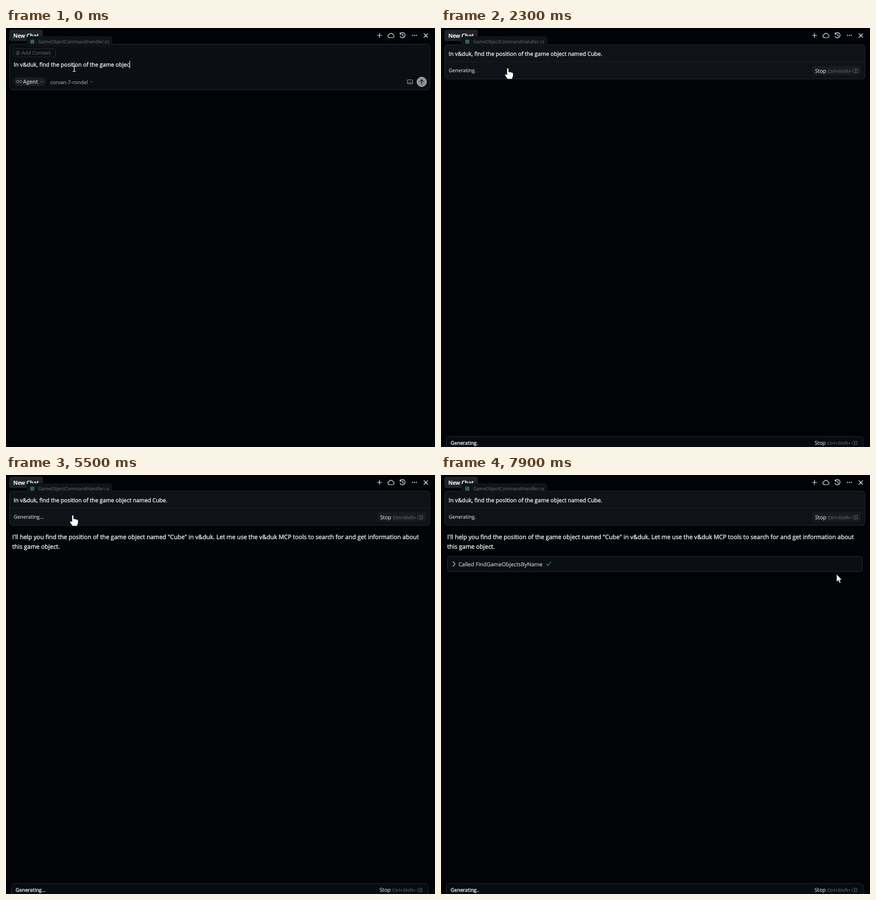
Write an HTML page that moves like this. It is 758 by 739 pixels and loops after 8000 ms.

```html
<!DOCTYPE html>
<html lang="en">
<head>
<meta charset="utf-8">
<title>Chat panel</title>
<style>
  html, body { margin: 0; width: 100%; height: 100%; overflow: hidden; background: #010306; }
  svg { display: block; width: 758px; height: 739px; }
  text { font: 9px "Open Sans", "Noto Sans", sans-serif; color: #c4c9cf; fill: currentColor; stroke: currentColor; stroke-width: .2px; white-space: pre; text-rendering: geometricPrecision; }
  .prompt { font-size: 9.8px; color: #f2f4f6; stroke-width: .3px; }
  .reply { font-size: 10.6px; color: #f4f6f8; stroke-width: .32px; }
  .status { font-size: 8.9px; }
  .call { font-size: 9.67px; }
  .bold { font-weight: 600; }
  .keys { font-size: 7.6px; letter-spacing: .42px; color: #626870; }
  .bright { color: #f2f4f6; stroke-width: .3px; }
  .dim { color: #9299a1; }
  .faint { color: #555b63; }
  .line { fill: none; stroke: #d5d9de; stroke-width: 1.2; stroke-linecap: round; stroke-linejoin: round; }
  .box { fill: #0b0e14; stroke: #22272e; }
  .btn { fill: #181c22; }
  .cursor path { fill: #fff; stroke: #111; stroke-width: .6; }
</style>
</head>
<body>
<svg viewBox="0 0 758 739">
  <defs>
    <path id="erase" d="M0 3L3 0H9.5V6H3ZM4.5 1.8L7 4.2M7 1.8L4.5 4.2" fill="none" stroke-width=".9"/>
    <path id="caretKey" d="M0 3L2 .3L4 3" fill="none" stroke-width=".9"/>
    <path id="enter" d="M0 4.7L3 2.500V3.800H5.500V.5H8V5.700H3V7Z" fill="none" stroke-width=".8"/>
    <g id="stop">
      <text x="4.5" y="12" style="font-size:9.3px">Stop</text>
      <text class="keys" x="27" y="12">Ctrl+Shift+</text>
      <use href="#erase" x="70" y="6" stroke="#626870"/>
    </g>
  </defs>
  <rect width="758" height="739" fill="#010306"/>

  <rect x="6" y="3" width="59" height="20" rx="4" fill="#1f2329"/>
  <text class="bold bright" x="13" y="16.5" style="font-size:9.6px">New Chat</text>
  <g class="line">
    <path d="M656 13H664M660 9V17M738.5 10L745 16.5M745 10L738.5 16.5"/>
    <path d="M678 17H683.5A2.6 2.6 0 0 0 684 12A3.8 3.8 0 0 0 677 11.5A2.8 2.8 0 0 0 678 17Z"/>
    <path d="M696.5 10.5A4.6 4.6 0 1 1 696.3 14.5M696.3 8.5V11H699M701 10.5V13.5L703 14.5"/>
    <path d="M718 13H718.1M721.5 13H721.6M725 13H725.1" stroke-width="2"/>
  </g>

  <g id="compose">
    <rect class="box" x="6.5" y="28.5" width="742.5" height="80.5" rx="5"/>
    <rect x="13.5" y="36.5" width="74" height="14.5" rx="3" fill="none" stroke="#22272e"/>
    <text class="faint" x="17" y="47">@ Add Context</text>
    <text class="prompt" id="typed" x="13.5" y="68"></text>
    <rect id="caret" y="58" width="1" height="13" fill="#fff"/>
    <rect x="13.5" y="87" width="57" height="15.5" rx="7.5" fill="#1b1f25"/>
    <path class="line" style="stroke:#9299a1;stroke-width:1" d="M23 94.5C21 91.5 18.5 92 18.5 94.5S21 97.5 23 94.5S27.5 92 27.5 94.5S25 97.5 23 94.5"/>
    <text class="bold" x="30" y="98" style="font-size:9.4px;color:#a9afb6">Agent</text>
    <path class="line" style="stroke:#6a7078;stroke-width:.9" d="M61.5 94.2L63.5 96.2L65.5 94.2M149 94.2L151 96.2L153 94.2"/>
    <text class="dim" x="78" y="98.5">corvan-7-rondel</text>
    <g class="line" style="stroke:#9299a1;stroke-width:1">
      <rect x="709" y="91.5" width="9.5" height="7" rx="1"/>
      <path d="M710 97.5L713 95L715 97L716.5 95.5L718 97"/>
    </g>
    <circle cx="734.5" cy="95" r="8.3" fill="#8b8f95" stroke="#c9ccd1"/>
    <path class="line" style="stroke:#15181c" d="M734.5 99V91.5M731.5 94.3L734.5 91.3L737.5 94.3"/>
  </g>

  <g id="chat">
    <g id="head">
      <rect class="box" x="6.5" y="28.5" width="742.5" height="60.5" rx="5" style="fill:#0f1319"/>
      <path d="M7 58.5H749" stroke="#1a1f26"/>
      <text class="prompt" id="sent" x="13.5" y="47.7"></text>
      <text class="status" id="topStatus" x="13.5" y="76.5"></text>
      <rect class="btn" x="656.5" y="65.5" width="85.5" height="16.5" rx="3"/>
      <use href="#stop" x="656.5" y="65.5"/>
    </g>
    <text class="reply" id="line1" x="11" y="113"></text>
    <text class="reply" id="line2" x="11" y="130"></text>
    <circle id="loader" cx="15.5" r=".7" fill="#2a2f36"/>

    <g id="tool">
      <rect class="box" id="toolBox" x="11.5" y="143.5" width="733" rx="4"/>
      <path class="line" style="stroke:#b3b9c0" d="M21 153L25 157L21 161"/>
      <text class="call" id="call" x="31" y="160.7"></text>
      <path id="check" class="line" style="stroke:#4c9a5e" d="M186.5 157L189 159.8L194 153.5"/>
      <g id="actions">
        <text class="dim" x="616" y="179.5">Cancel</text>
        <use href="#caretKey" x="647.5" y="174.5" stroke="#626870"/>
        <use href="#erase" x="653.5" y="173.5" stroke="#626870"/>
        <rect x="673.5" y="167.5" width="63.5" height="18" rx="3" fill="#2c9a40"/>
        <text class="bright" x="679.5" y="179.5">Run tool</text>
        <use href="#caretKey" x="719" y="174.5" stroke="#b9dcc0"/>
        <use href="#enter" x="723.5" y="173" stroke="#b9dcc0"/>
      </g>
    </g>

    <rect class="box" x="9.5" y="720.5" width="736.5" height="30" rx="5" style="fill:#080b11"/>
    <text class="status bright" id="lowStatus" x="17" y="734.5"></text>
    <use href="#stop" id="lowStop" y="723"/>
    <g id="accept">
      <rect class="btn" x="685.5" y="723" width="55" height="20" rx="3"/>
      <text x="690.5" y="734.7">Accept</text>
      <use href="#caretKey" x="722.5" y="729" stroke="#aeb4bb"/>
      <use href="#enter" x="727" y="727.5" stroke="#aeb4bb"/>
    </g>
  </g>

  <rect x="36" y="14.5" width="152" height="18.5" rx="5" fill="#10141a"/>
  <rect x="43" y="20.5" width="7" height="7" fill="#2f6658"/>
  <text class="faint" x="57" y="27" style="font-size:8px">GameObjectCommandHandler.cs</text>

  <g class="cursor">
    <path id="beam" d="M-2.5 -5H-.5V-4.5H.5V-5H2.5V-4H.5V4H2.5V5H-2.5V4H-.5V-4H-2.5Z" style="stroke:none"/>
    <path id="hand" d="M-2.5 0Q-1 -2.5 .5 0V5.5Q2 4.5 3 6Q4.5 5 5.5 6.7Q8 6 8.5 8.5V12.5L6.5 18H-1.5L-6 11.5Q-6.5 9 -4 9.5L-2.5 11Z"/>
    <path id="arrow" d="M0 0V13.5L3 10.7L5.2 15.5L7.4 14.5L5.2 9.9H9.3Z"/>
  </g>
</svg>
<script>
  const LOOP = 8000;
  const START = "In v&duk, find the position of the game objec";
  const PROMPT = START + "t named Cube.";
  const LINE1 = "I'll help you find the position of the game object named \"Cube\" in v&duk. Let me use the v&duk MCP tools to search for and get information about";
  const REPLY = LINE1 + " this game object.";
  const endOf = part => REPLY.indexOf(part) + part.length;
  const STREAM = [[3900, 0], [4700, endOf("Let me")], [4800, endOf("Let me")],
    [5000, endOf("information")], [5100, endOf("information")], [5400, REPLY.length]];
  const MOUSE_X = [[6000, 119], [6300, 381], [6900, 690], [7100, 698], [7400, 698], [7700, 699]];
  const MOUSE_Y = [[6000, 72], [6300, 204], [6900, 186], [7100, 183], [7400, 183], [7700, 175]];

  const $ = id => document.getElementById(id);
  const show = (id, on) => $(id).style.display = on ? "" : "none";
  const write = (id, s) => $(id).textContent = s;
  const clamp = v => Math.max(0, Math.min(1, v));

  function track(keys, t) {
    const i = keys.findIndex(k => k[0] > t);
    if (i < 0) return keys[keys.length - 1][1];
    if (!i) return keys[0][1];
    const [t0, a] = keys[i - 1], [t1, b] = keys[i];
    return a + (b - a) * (t - t0) / (t1 - t0);
  }

  function typedText(t) {
    const named = START + "t named ";
    if (t < 1000) return named.slice(0, START.length + Math.max(0, t / 100 - 1));
    if (t < 1100) return named;
    if (t < 1300) return named + "U";
    if (t < 2000) return named + "Cube".slice(0, t / 100 - 13);
    return PROMPT;
  }

  // Only whole words appear while the reply streams in.
  function streamed(t) {
    const n = Math.round(track(STREAM, t));
    if (n >= REPLY.length || REPLY[n] === " ") return REPLY.slice(0, n);
    return REPLY.slice(0, Math.max(0, REPLY.lastIndexOf(" ", n)));
  }

  const dots = (t, since) => t < since ? "" : ".".repeat(Math.floor((t - since) / 230) % 3 + 1);

  function drawCursor(t) {
    const over = t >= 6900 && t < 7500;
    const kind = t < 2200 ? "beam" : t < 6100 || over ? "hand" : "arrow";
    for (const id of ["beam", "hand", "arrow"]) show(id, id === kind);
    const x = track(MOUSE_X, t) + (kind === "beam" ? 1.5 : 0);
    $(kind).setAttribute("transform", `translate(${x} ${track(MOUSE_Y, t)})`);
  }

  function draw(t) {
    const sent = t >= 2200, waiting = t >= 6200 && t < 7500;
    const ran = t >= 7500, called = t >= 7700;
    show("compose", !sent);
    show("chat", sent);
    drawCursor(t);

    if (!sent) {
      write("typed", typedText(t));
      $("caret").setAttribute("x", 13.5 + $("typed").getComputedTextLength());
      return;
    }

    const drop = Math.max(0, 2400 - t) / 100;
    $("head").setAttribute("transform", `translate(0 ${drop})`);
    write("sent", PROMPT);
    const label = waiting ? "Waiting for approval" : "Generating";
    write("topStatus", label + dots(t, t < 6200 ? 2170 : 6320));
    write("lowStatus", label + dots(t, t < 6200 ? 2170 : 6200));
    $("lowStop").setAttribute("x", waiting ? 597.5 : 655.5);
    show("accept", waiting);

    const reply = streamed(t);
    write("line1", reply.slice(0, LINE1.length));
    write("line2", reply.slice(LINE1.length + 1));
    show("loader", t >= 2300 && t < 4000 || called);
    $("loader").setAttribute("cy", called ? 195.5 : 115.5);

    const shown = clamp((t - 6100) / 450);
    $("tool").setAttribute("opacity", shown);
    $("tool").setAttribute("transform", `translate(0 ${(1 - shown) * 7.2})`);
    $("toolBox").setAttribute("height", ran ? 27 : 47);
    write("call", (called ? "Called" : "Calling") + " FindGameObjectsByName");
    show("check", called);
    show("actions", !ran);
  }

  const begin = performance.now();
  function tick() {
    const t = (performance.now() - begin) % LOOP;
    draw(Math.floor(t / 100) * 100);
    requestAnimationFrame(tick);
  }
  tick();
</script>
</body>
</html>
```
